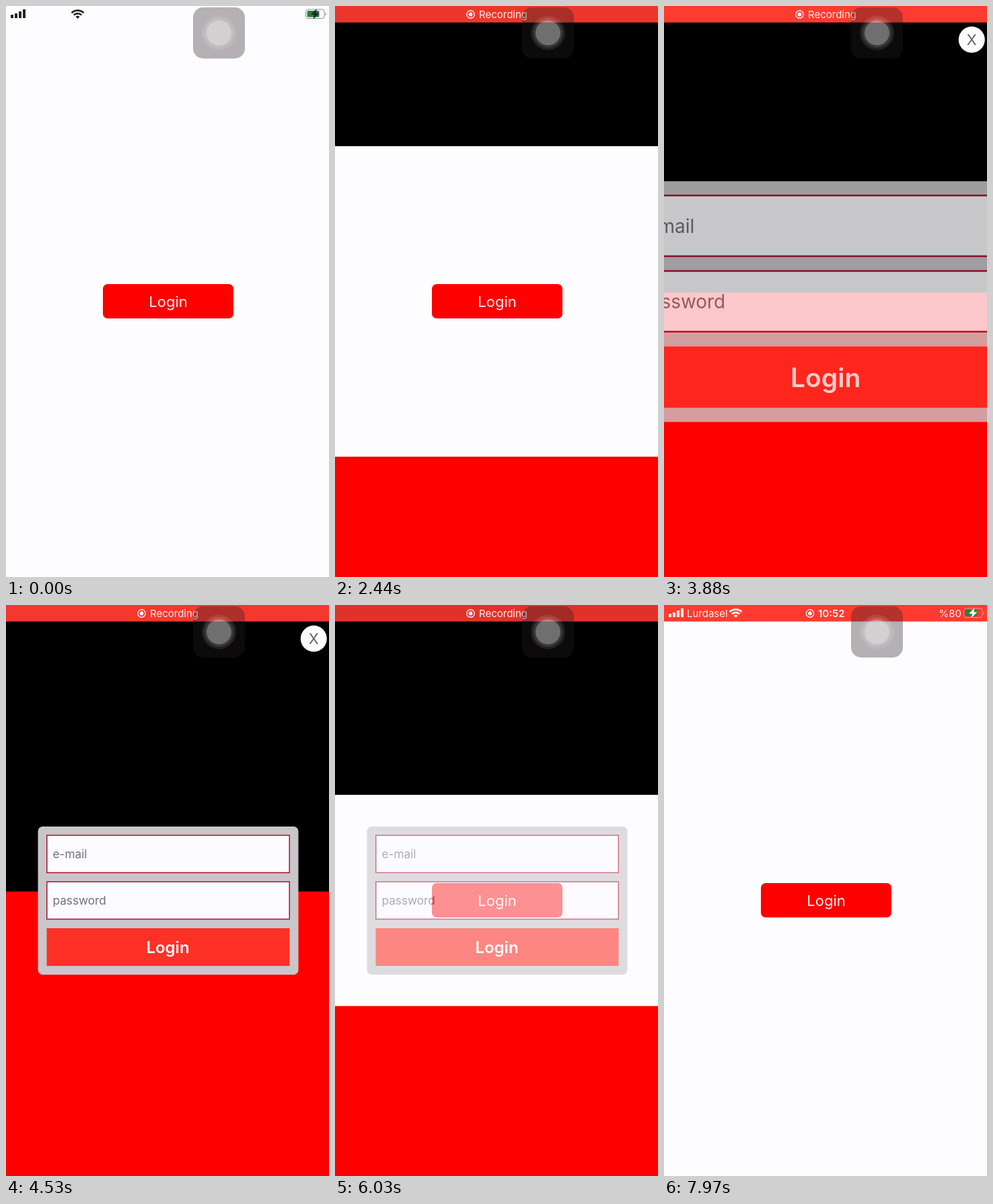
An HTML page that plays this animation: 480x848 px, repeating every 7.99 s.

```html
<!DOCTYPE html>
<html lang="en">
<head>
<meta charset="utf-8">
<title>Login door</title>
<style>
  html, body { margin: 0; width: 100%; height: 100%; overflow: hidden; background: #fdfcff; }
  svg { display: block; width: 100%; height: 100%; }
  text { font-family: Inter, Roboto, sans-serif; }
  .status text { font-size: 15px; fill: currentColor; }
  .time { font-weight: 600; }
  .field { fill: #fcfbff; stroke: #a8102c; stroke-width: 1.5; }
  .hint { font-size: 17.2px; fill: #77707a; }
</style>
</head>
<body>
<svg viewBox="0 0 480 848">
  <defs>
    <g id="icons" fill="currentColor">
      <path d="M7 13h4v5h-4zM13 11h4v7h-4zM19 8h4v10h-4zM25 5h4v13h-4z"/>
      <g fill="none" stroke="currentColor" stroke-width="2.6">
        <path d="M97.500 10.200a13 13 0 0 1 18 0M100.700 13.400a8.500 8.500 0 0 1 11.600 0"/>
      </g>
      <path d="M106.500 19l-3-3.200a4.400 4.400 0 0 1 6 0z"/>
      <rect x="445.500" y="5" width="27.500" height="13.500" rx="3.500" fill="none" stroke="currentColor" opacity=".5"/>
      <path d="M474.500 9.500a3 3 0 0 1 0 5z" opacity=".5"/>
      <rect x="447.500" y="7" width="18" height="9.500" rx="1.500" fill="#23823c"/>
      <path d="M461.500 4l-8.500 9h5l-1.500 6.500 9-9h-5z"/>
    </g>
    <g id="record">
      <circle r="5.700" fill="none" stroke="currentColor" stroke-width="1.400"/>
      <circle r="2.900" fill="currentColor"/>
    </g>
  </defs>

  <rect width="480" height="848" fill="#fdfcff"/>
  <rect x="144" y="413" width="194" height="51" rx="7" fill="#f00"/>
  <text x="241" y="447" font-size="22" text-anchor="middle" fill="#fff0f0">Login</text>

  <rect id="upper" width="480"/>
  <rect id="lower" width="480" height="848" fill="#f00"/>

  <g id="card">
    <rect x="47.500" y="329" width="387" height="220" rx="7" fill="#c9c6ca"/>
    <rect class="field" x="60.750" y="342" width="360.500" height="55.500"/>
    <rect class="field" x="60.750" y="411" width="360.500" height="55.500"/>
    <text class="hint" x="69.500" y="376">e-mail</text>
    <text class="hint" x="69.500" y="445">password</text>
    <rect x="60.500" y="480" width="361" height="56" fill="#ff3026"/>
    <text x="240.500" y="517" font-size="24" font-weight="600" text-anchor="middle" fill="#fff">Login</text>
  </g>

  <g id="close">
    <circle cx="457.300" cy="50" r="19.500" fill="#fff"/>
    <text x="457.300" y="58" font-size="22" text-anchor="middle" fill="#6b5f62">X</text>
  </g>

  <g class="status">
    <use id="darkIcons" href="#icons" color="#2a2224"/>
    <rect id="bar" width="480" height="24.500"/>
    <g id="clock" color="#fff4f2">
      <use href="#icons"/>
      <text x="34" y="18">Lurdasel</text>
      <text x="442" y="18" text-anchor="end">%80</text>
      <g id="clockLabel">
        <use href="#record" x="217" y="12.500"/>
        <text class="time" x="229" y="18">10:52</text>
      </g>
    </g>
    <g id="recording" color="#fff0ee">
      <use href="#record" x="201.500" y="12.500"/>
      <text x="214" y="18">Recording</text>
    </g>
  </g>

  <rect x="278" y="2" width="77" height="76" rx="15" fill="rgb(40,30,32)" fill-opacity=".34"/>
  <g fill="#fff">
    <circle cx="316.500" cy="40" r="25.500" fill-opacity=".09"/>
    <circle cx="316.500" cy="40" r="22" fill-opacity=".1"/>
    <circle cx="316.500" cy="40" r="18.500" fill-opacity=".28"/>
  </g>
</svg>
<script>
const LOOP = 7990;
const CLOSED = 452;       // lower edge of the upper door when shut
const DOOR_SUM = 877.5;   // upper edge + lower edge stays constant
const $ = id => document.getElementById(id);
const set = (id, attrs) => {
  for (const name in attrs) $(id).setAttribute(name, attrs[name]);
};
const ramp = (t, start, length) => Math.min(1, Math.max(0, (t - start) / length));
const mix = (a, b, k) => a + (b - a) * k;

// Ease-in-out: cubic-bezier(.42, 0, .58, 1), solved by bisection
function ease(x) {
  let low = 0, high = 1;
  for (let i = 0; i < 24; i++) {
    const s = (low + high) / 2, r = 1 - s;
    if (1.26 * s * r * r + 1.74 * s * s * r + s ** 3 < x) low = s;
    else high = s;
  }
  return low * low * (3 - 2 * low);
}

function draw(t) {
  const shut = ease(ramp(t, 1630, 1700));
  const open = ease(ramp(t, 5279, 1760));
  const edge = CLOSED * (shut - open);
  set('upper', { height: Math.max(0, edge) });
  set('lower', { y: DOOR_SUM - edge });

  const arrive = ease(ramp(t, 3353, 772));
  const leave = ease(ramp(t, 5279, 1640));
  set('card', {
    opacity: arrive * (1 - leave),
    transform: `translate(241 439) scale(${mix(4, 1, arrive)}) translate(-241 -439)`
  });
  set('close', { opacity: t >= 3330 && t < 5279 ? 1 : 0 });

  const appear = ramp(t, 10, 400);
  const pulse = 0.5 + 0.5 * Math.cos((t - 3650) / 4300 * 2 * Math.PI);
  set('bar', {
    opacity: appear,
    fill: `rgb(${mix(224, 255, pulse)}, ${mix(50, 59, pulse)}, ${mix(42, 48, pulse)})`
  });
  set('darkIcons', { opacity: 1 - appear });

  const toRecording = ramp(t, 1600, 400);
  const toClock = ramp(t, 6410, 420);
  const newLabel = Math.min(1, toClock * 6.5);
  const label = Math.max(1 - toRecording, newLabel);
  const clock = Math.max(1 - toRecording, toClock);
  for (const node of $('clock').children)
    node.setAttribute('opacity', appear * (node.id ? label : clock));
  set('clockLabel', { transform: `translate(${toRecording < 1 ? 0 : -3 * (1 - toClock)} 0)` });
  set('recording', { opacity: toRecording * (1 - newLabel) });
}

function frame() {
  draw(performance.now() % LOOP);
  requestAnimationFrame(frame);
}
frame();
</script>
</body>
</html>
```
